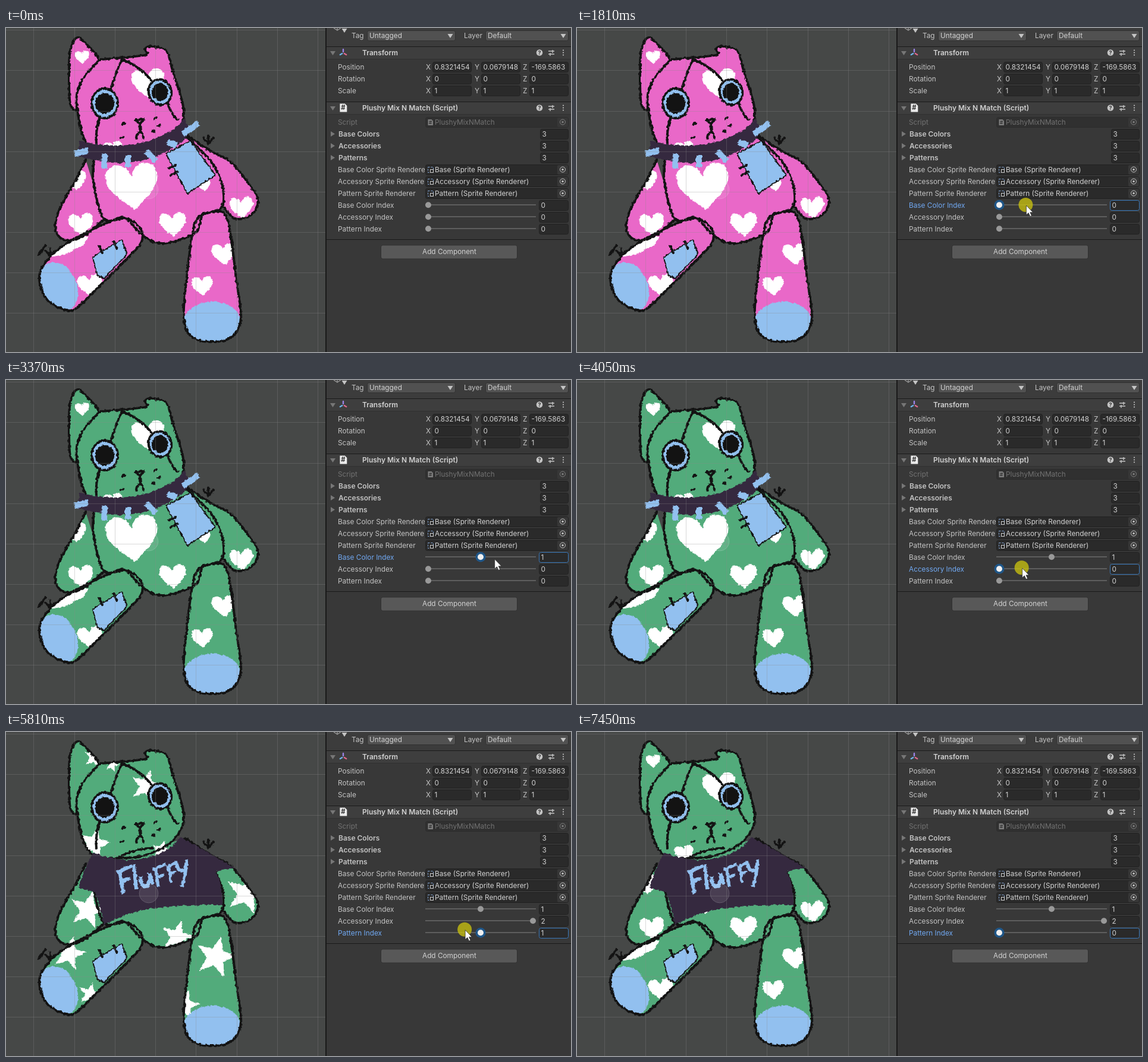
An HTML page that plays this animation: 950x546 px, repeating every 8360 ms.

```html
<!DOCTYPE html>
<html lang="en">
<head>
<meta charset="utf-8">
<title>Plushy Mix N Match</title>
<style>
  html, body { margin: 0; width: 100%; height: 100%; overflow: hidden; background: #383838; }
  svg { display: block; }
  text { font: 11.8px Inter, sans-serif; fill: #c4c4c4; white-space: pre; }
  .bold { font-weight: 600; font-size: 12px; }
  .value { fill: #d2d2d2; }
  .dim { fill: #727272; }
  .field { fill: #2a2a2a; stroke: #212121; }
  .drop { fill: #515151; stroke: #303030; }
  .button { fill: #585858; stroke: #303030; }
  .line { fill: none; stroke: #131313; stroke-width: 4; stroke-linecap: round; stroke-linejoin: round; }
  .blue { fill: #92c0ef; }
  .blueLine { fill: none; stroke: #92c0ef; stroke-width: 6; }
  .dark { fill: #35293f; }
  .focus .label { fill: #71a9f3; }
  .focus .field { stroke: #3a79bb; }
  .focus .knob { fill: #f0f0f0; }
  .halo { fill: #1f5688; visibility: hidden; }
  .focus .halo { visibility: visible; }
</style>
</head>
<body>
<svg width="950" height="546" viewBox="0 0 950 546">
  <defs>
    <filter id="rough" x="0" y="0" width="540" height="546" filterUnits="userSpaceOnUse" color-interpolation-filters="sRGB">
      <feTurbulence type="fractalNoise" baseFrequency=".2" numOctaves="2" seed="4"/>
      <feColorMatrix values="1 0 0 0 0  0 1 0 0 0  0 0 1 0 0  0 0 0 0 1" result="noise"/>
      <feDisplacementMap in="SourceGraphic" in2="noise" scale="5" xChannelSelector="R" yChannelSelector="G"/>
    </filter>
    <clipPath id="skin"></clipPath>
    <path id="letterF" d="M5 0L11 39M0 4L26 -8M6 20L23 13"/>
  </defs>

  <rect width="538" height="546" fill="#464847"/>
  <g id="fill"></g>
  <g filter="url(#rough)">
    <g fill="#fff" clip-path="url(#skin)">
      <g class="pattern" id="hearts"></g>
      <g class="pattern" id="stars"></g>
      <g class="pattern" id="dots"></g>
    </g>
    <g class="blue">
      <g id="feet" clip-path="url(#skin)">
        <ellipse cx="88" cy="436" rx="31" ry="43" transform="rotate(-24 88 436)"/>
        <ellipse cx="347" cy="496" rx="48" ry="35"/>
      </g>
      <path d="M146 386L195 356L203 382L165 422L153 417ZM269 212L310 190L352 248L305 279Z" stroke="#131313" stroke-width="2"/>
    </g>
    <g id="eyes"></g>
    <g class="line" id="lines"></g>
    <path class="line" d="M195 53Q182 80 177 102M157 152Q150 175 152 196M195 53Q225 64 244 88M272 126Q276 143 288 154"/>
    <path class="line" d="M218 155L231 154L225 162ZM225 162L226 175Q219 178 219 185M226 175Q231 178 231 185M190 211Q220 195 246 196"/>
    <g class="line" id="stitches"></g>

    <g class="accessory">
      <path class="dark" d="M124 190Q190 206 240 190Q285 175 300 152L307 167Q310 185 285 199Q250 225 190 228Q150 226 120 215Z"/>
      <path class="blueLine" style="stroke-width:10" d="M115 212L138 207M166 212L165 236M205 214V235M236 208L252 224M271 192L287 198M297 179L324 160"/>
    </g>
    <g class="accessory">
      <path class="blue" stroke="#131313" stroke-width="3" d="M126 196Q190 218 240 201Q285 190 300 171L307 188Q285 218 250 226L218 270L180 230Q145 228 121 214Z"/>
    </g>
    <g class="accessory">
      <path class="dark" d="M146 203Q200 225 250 208Q285 195 292 176L385 229L353 235Q365 260 364 291Q300 290 240 298Q200 305 165 325Q160 300 150 270L122 262Q130 235 146 203Z"/>
      <g class="blueLine">
        <use href="#letterF" transform="translate(186 233)"/>
        <path d="M215 224L219 265M226 243Q227 263 235 260Q243 257 241 238L247 257"/>
        <use href="#letterF" transform="translate(247 229) scale(.85)"/>
        <use href="#letterF" transform="translate(269 225) scale(.75)"/>
        <path d="M287 222Q290 238 299 232M304 215L301 240L296 261"/>
      </g>
    </g>
  </g>
  <circle cx="240" cy="272" r="16" fill="#fff" fill-opacity=".1" stroke="#fff" stroke-opacity=".16"/>
  <path id="grid" fill="none" stroke="#888" stroke-opacity=".32"/>

  <g id="panel"></g>
  <g id="pointer">
    <circle id="press" cx="-1" cy="-1" r="12" fill="#c8c00f" fill-opacity=".78"/>
    <path d="M0 0V16L3.7 12.6L6.5 18.5L9 17.3L6.4 11.7H11.3Z" fill="#fff" stroke="#222" stroke-width=".7"/>
  </g>
</svg>
<script>
const LOOP = 8360;
const SKINS = ['#e968c8', '#52ab7b', '#e8893a'];
const $ = id => document.getElementById(id);
const range = n => [...Array(n).keys()];

// Smooth path through a few points
function curve(outline) {
  const points = outline.split(' ').map(p => p.split(',').map(Number));
  const at = i => points[Math.max(0, Math.min(points.length - 1, i))];
  const handle = (i, side) => at(i).map((v, k) => v + side * (at(i + 1)[k] - at(i - 1)[k]) / 6);
  return `<path d="M${at(0)}${points.slice(1).map((p, i) => `C${handle(i, 1)} ${handle(i + 1, -1)} ${p}`).join('')}"/>`;
}

const plush = {
  body: '148,222 147,260 165,322 200,320 230,350 265,363 318,345 330,316 350,309 365,298 363,262 345,225 300,180',
  leftArm: '134,222 118,255 91,303 83,338 98,357 130,351 165,322',
  rightArm: '303,180 340,205 378,226 408,262 424,290 412,315 385,321 363,298',
  leftLeg: '122,470 150,442 200,392 228,360 222,333 190,322 115,355 72,388 56,420 70,459 105,476 122,470',
  rightLeg: '347,309 372,322 388,430 395,490 380,520 347,529 312,520 299,488 304,420 318,328 347,309',
  ear: '118,140 108,128 106,85 108,38 121,16 140,32 158,53',
  head: '158,53 195,50 235,45 234,35 246,31 270,39 279,68 299,140 285,178 250,202 205,212 142,204 119,130 128,88 158,53'
};
const shapes = Object.values(plush).map(curve).join('');
for (const id of ['fill', 'skin', 'lines']) $(id).innerHTML = shapes;

const heart = (x, y, size) =>
  `<path transform="translate(${x} ${y}) scale(${size} ${size * .92}) rotate(-3)" d="M.03 .5C-.1 .35 -.5 .12 -.5 -.18C-.5 -.5 -.15 -.58 0 -.22C.1 -.62 .5 -.56 .5 -.2C.5 .05 .2 .3 .03 .5Z"/>`;
const star = (x, y, size) => {
  const points = range(10).map(i => {
    const r = size * (i % 2 ? .42 : 1), a = i * Math.PI / 5 + .25;
    return [x + r * Math.sin(a), y - r * Math.cos(a)];
  });
  return `<polygon points="${points.join(' ')}"/>`;
};
const scatter = (shape, spots) => spots.map(s => shape(...s)).join('');

$('hearts').innerHTML = scatter(heart, [
  [212, 267, 87], [128, 49, 24], [239, 94, 56], [180, 205, 32], [117, 257, 36], [126, 331, 42],
  [396, 303, 40], [280, 331, 45], [333, 265, 22], [141, 434, 42], [366, 381, 40], [330, 435, 36]
]) + '<path d="M75 386L108 357L138 351L131 365L100 381Z"/>';
$('stars').innerHTML = scatter(star, [
  [148, 43, 18], [178, 55, 13], [236, 91, 28], [148, 188, 28], [262, 200, 18], [138, 300, 33],
  [404, 272, 36], [288, 345, 28], [106, 373, 30], [141, 442, 20], [353, 379, 36], [301, 460, 26]
]);
$('dots').innerHTML = range(70).map(i => {
  const row = Math.floor(i / 7);
  return `<circle cx="${50 + (i % 7) * 60 + (row % 2) * 30}" cy="${40 + row * 52}" r="15"/>`;
}).join('');

const eye = (x, y, r, turn) => `<g transform="rotate(${turn} ${x} ${y})">
  <ellipse cx="${x}" cy="${y}" rx="${r}" ry="${r * 1.14}" class="blue" stroke="#131313" stroke-width="4"/>
  <ellipse cx="${x}" cy="${y}" rx="${r * .73}" ry="${r * .78}" fill="#131313"/></g>`;
$('eyes').innerHTML = eye(166, 127, 22, 0) + eye(259, 108, 19, -15);

const dash = (x, y, dx, dy) => `<path d="M${x} ${y}l${dx} ${dy}"/>`;
const tuft = (x, y) => [-9, -1, 8].map(dx => dash(x, y, dx, -14 + Math.abs(dx) / 2)).join('');
$('stitches').innerHTML = tuft(341, 195) + tuft(75, 385) + dash(55, 382, 11, -16) +
  [[273, 237], [277, 248]].map(p => dash(...p, 12, -6)).join('') +
  [[157, 367], [181, 359]].map(p => dash(...p, 5, 12)).join('') +
  [[195, 162], [193, 186], [249, 153], [255, 165], [246, 175]].map(p => dash(...p, 4, -2)).join('');

$('grid').setAttribute('d', range(8).map(i =>
  `M${Math.round(46.3 + i * 68.25) + .5} 0V546M0 ${Math.round(3.2 + i * 68.15) + .5}H538`).join(''));

// Inspector panel
const text = (x, y, s, cls = '') => `<text x="${x}" y="${y + 4}" class="${cls}">${s}</text>`;
const box = (x, y, w, cls = 'field', h = 18) =>
  `<rect x="${x + .5}" y="${y - h / 2 + .5}" width="${w - 1}" height="${h - 1}" rx="3" class="${cls}"/>`;
const arrow = (x, y, turn = 0, color = '#777') =>
  `<path d="M-4.5 -3H4.5L0 4Z" transform="translate(${x} ${y}) rotate(${turn})" fill="${color}"/>`;
const field = (x, y, w, s) =>
  box(x, y, w) + `<svg x="${x}" y="${y - 9}" width="${w - 1}" height="18">${text(3.5, 9, s, 'value')}</svg>`;
const dropdown = (x, y, w, s) => box(x, y, w, 'drop') + text(x + 4, y, s, 'value') + arrow(x + w - 9, y, 0, '#c4c4c4');

const header = (y, title) =>
  `<rect x="539" y="${y - 11}" width="411" height="1" fill="#1a1a1a"/>
   <rect x="539" y="${y - 10}" width="411" height="20" fill="#3e3e3e"/>
   <rect x="539" y="${y + 10}" width="411" height="1" fill="#303030"/>` +
  arrow(549.5, y) + text(599, y, title, 'bold value') +
  `<circle cx="897" cy="${y - .5}" r="5.3" fill="#c4c4c4"/>
   <text x="897" y="${y + 2.7}" text-anchor="middle" style="font-size:9px;font-weight:700;fill:#333">?</text>
   <path d="M912 ${y - 3}h10m-10 5h10m-3 -7v5m-4 0v5" fill="none" stroke="#c4c4c4" stroke-width="1.4"/>` +
  [-4, 0, 4].map(d => `<circle cx="937" cy="${y + d - .5}" r="1.1" fill="#c4c4c4"/>`).join('');

const vector = (y, label, values) => text(558, y, label) + values.map((value, i) => {
  const x = 717 + Math.round(i * 81.6);
  return text(x - 11, y, 'XYZ'[i]) + field(x, y, 66, value);
}).join('');

const list = (y, label) => arrow(549, y - .5, -90) + text(559, y, label, 'bold') + field(898, y, 48, '3');

const scriptIcon = (x, y, s, color) =>
  `<path d="M${x - s * .8} ${y - s}h${s * 1.2}l${s * .5} ${s * .5}v${s * 1.5}h${s * -1.7}Z" fill="${color}"/>
   <text x="${x}" y="${y + s * .55}" text-anchor="middle" style="font-size:${s * 1.6}px;font-weight:700;fill:#333">#</text>`;

const target = y =>
  `<rect x="927" y="${y - 8}" width="18" height="16" rx="2" fill="#373737"/>
   <circle cx="936" cy="${y - .5}" r="4.5" fill="none" stroke="#c4c4c4"/><circle cx="936" cy="${y - .5}" r="1.7" fill="#c4c4c4"/>`;

const reference = (y, label, s) =>
  `<svg x="539" y="${y - 10}" width="165" height="20">${text(19, 10, label + ' Sprite Renderer')}</svg>` +
  box(705, y, 241) + text(721, y, s + ' (Sprite Renderer)', 'value') +
  `<rect x="709.5" y="${y - 4.5}" width="9" height="9" fill="none" stroke="#86a9d8" stroke-dasharray="3 2"/>
   <rect x="713.5" y="${y - .5}" width="5" height="5" fill="#2a2a2a" stroke="#d0d0d0"/>` + target(y);

const slider = (y, label) => `<g class="slider">${text(558, y, label + ' Index', 'label')}
  <rect x="705" y="${y - 2}" width="186" height="2" fill="#5e5e5e"/>
  <g class="thumb"><circle class="halo" cy="${y - .8}" r="8.5"/><circle class="knob" cy="${y - .8}" r="5" fill="#999"/></g>
  ${box(896, y, 50)}${text(899.5, y, '0', 'value number')}</g>`;

$('panel').innerHTML =
  `<rect x="537" width="413" height="546" fill="#383838"/><rect x="537" width="2" height="546" fill="#191919"/>
   <rect x="539" width="411" height="31" fill="#3c3c3c"/>
   <path d="M551 0L557 4L563 0M557 4V0" fill="none" stroke="#999" stroke-width="1.3"/>` +
  arrow(569, 4, 0, '#c4c4c4') +
  text(581, 13, 'Tag') + dropdown(607, 13, 149, 'Untagged') +
  text(770, 13, 'Layer') + dropdown(806, 13, 140, 'Default') +
  header(42, 'Transform') +
  ['#9d83e8', '#e0688c', '#6db5e8'].map((color, i) =>
    `<path d="M0 -2V-6" transform="translate(567 42) rotate(${i * 120})" stroke="${color}" stroke-width="2.4" stroke-linecap="round"/>`).join('') +
  vector(66, 'Position', ['0.8321454', '0.0679148', '-169.5863']) +
  vector(86, 'Rotation', [0, 0, 0]) + vector(106, 'Scale', [1, 1, 1]) +
  header(135, 'Plushy Mix N Match (Script)') + scriptIcon(567, 134.5, 7, '#ededed') +
  text(558, 159, 'Script', 'dim') + `<g opacity=".5">${box(705, 159, 241)}${target(159)}</g>` +
  scriptIcon(713.5, 159, 5, '#7c7c7c') + text(721, 159, 'PlushyMixNMatch', 'dim') +
  ['Base Colors', 'Accessories', 'Patterns'].map((s, i) => list(179 + i * 20, s)).join('') +
  ['Base Color', 'Accessory', 'Pattern'].map((s, i) =>
    reference(239 + i * 20, s, s.split(' ')[0]) + slider(299 + i * 20, s)).join('') +
  `<rect x="539" y="356" width="411" height="1" fill="#1a1a1a"/>` +
  box(630, 377.5, 230, 'button', 24) + text(700, 377, 'Add Component', 'value');

// Pointer moves: start, end, x, y, easing power; it rests in between
const MOVES = [
  [480, 1050, 677, 271], [1050, 1230, 711, 299], [1380, 2430, 922, 299, 1.75], [2810, 3170, 822, 302],
  [3370, 3800, 711, 318], [3800, 4490, 932, 313, 1.75], [4670, 5200, 711, 334], [5390, 5510, 753, 333],
  [5750, 6200, 894, 338], [6200, 6630, 742, 339], [6690, 6890, 706, 340], [7130, 7450, 676, 546]
];
const DRAGS = [[1380, 3370], [3800, 4670], [5200, 7130]];

function pointerAt(t) {
  let x = 934, y = 440;
  for (const [start, end, toX, toY, power = 1] of MOVES) {
    const p = Math.max(0, Math.min(1, (t - start) / (end - start))) ** power;
    x += (toX - x) * p;
    y += (toY - y) * p;
  }
  return [x, y];
}

function dragValue(t, [start, end]) {
  if (t < start) return 0;
  const [x] = pointerAt(Math.min(t, end));
  return Math.max(0, Math.min(2, Math.round((x - 713) / 88)));
}

const show = (el, on) => { el.style.display = on ? '' : 'none'; };
const all = cls => [...document.querySelectorAll(cls)];
const sliders = all('.slider'), accessories = all('.accessory'), patterns = all('.pattern');

function render(t) {
  const [color, accessory, pattern] = DRAGS.map(d => dragValue(t, d));
  const focus = DRAGS.filter(d => t >= d[0]).length - 1;
  [color, accessory, pattern].forEach((value, i) => {
    sliders[i].classList.toggle('focus', i === focus);
    sliders[i].querySelector('.thumb').setAttribute('transform', `translate(${710 + 88 * value} 0)`);
    sliders[i].querySelector('.number').textContent = value;
  });
  $('fill').setAttribute('fill', SKINS[color]);
  accessories.forEach((el, i) => show(el, i === accessory));
  patterns.forEach((el, i) => show(el, i === pattern));
  $('feet').style.fill = pattern === 2 ? '#fff' : '';
  show($('pointer'), t >= 480 && t < 7450);
  $('pointer').setAttribute('transform', `translate(${pointerAt(t).join(' ')})`);
  show($('press'), DRAGS.some(([start, end]) => t >= start && t < end));
}

const began = performance.now();
function tick() {
  render((performance.now() - began) % LOOP);
  requestAnimationFrame(tick);
}
render(0);
requestAnimationFrame(tick);
</script>
</body>
</html>
```
